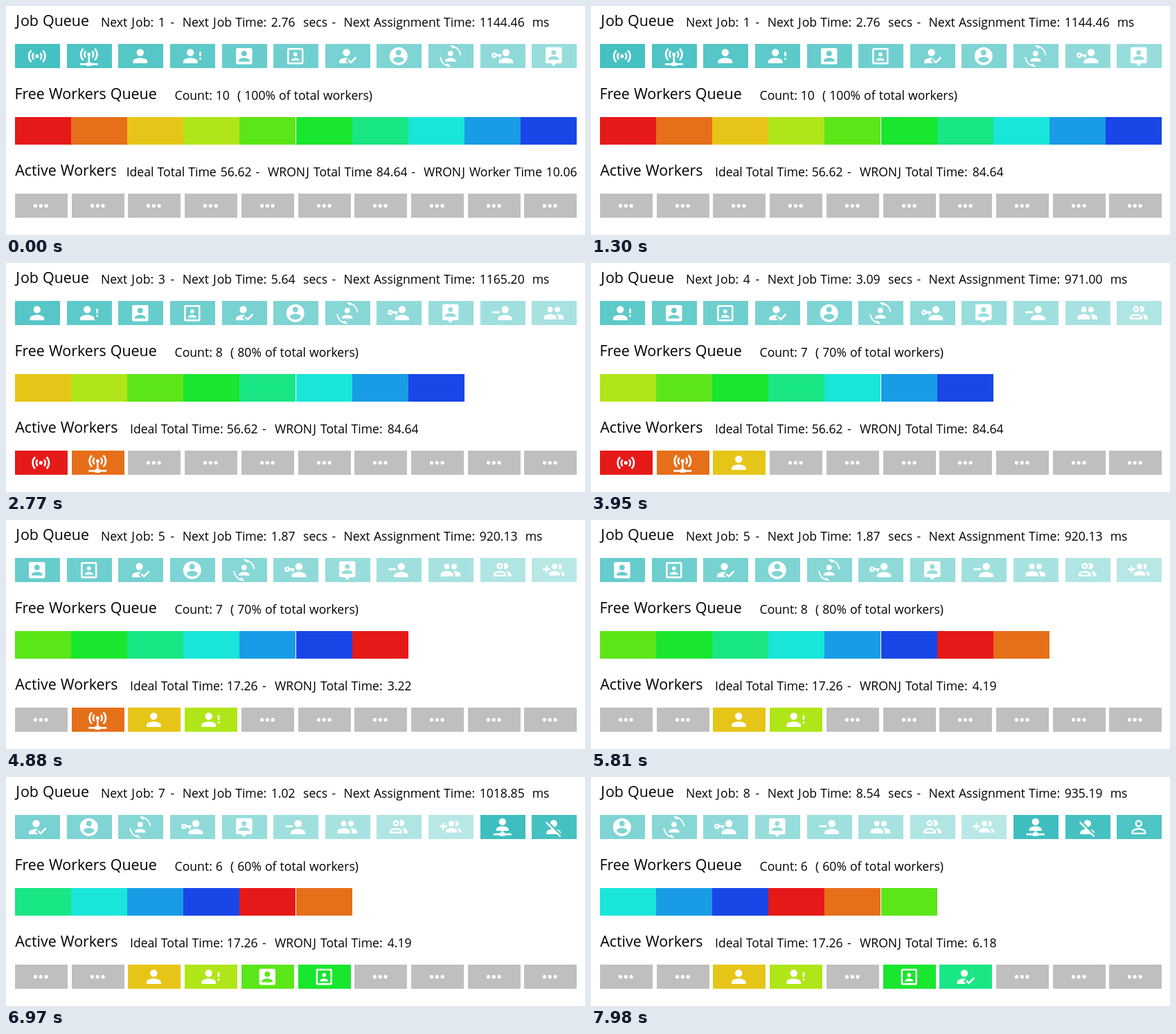
Recreate the animation shown at these times as an HTML page. Size 836 by 332 pixels, loop 8000 ms.

```html
<!DOCTYPE html>
<html lang="en">
<head>
<meta charset="utf-8">
<title>Job Queue</title>
<style>
html, body { margin: 0; width: 100%; height: 100%; overflow: hidden; background: #fff; }
svg { display: block; width: 836px; height: 332px; }
text { font: 17.6px "Open Sans", "Noto Sans", sans-serif; word-spacing: .5px; fill: #000; }
.title { font-size: 21.4px; }
.icon { fill: #fff; fill-rule: evenodd; }
</style>
</head>
<body>
<svg id="stage" viewBox="0 0 836 332">
  <defs>
    <clipPath id="titleClip"><rect x="0" y="222" width="158.5" height="34"/></clipPath>
    <clipPath id="timeClip"><rect x="600" y="222" width="174.5" height="34"/></clipPath>
  </defs>
  <g id="view"></g>
</svg>
<script>
const LOOP = 8000;
const RUN_START = 1300;

// ---- icons on a 24 unit grid ----
const disc = (x, y, r) => `M${x - r},${y}a${r},${r} 0 1 1 ${2 * r},0a${r},${r} 0 1 1 ${-2 * r},0Z`;
const wave = (cy, r, side) => {
  const a = r * Math.SQRT1_2, b = (r - 2) * Math.SQRT1_2, out = side > 0 ? 1 : 0;
  return `M${12 + side * a},${cy - a}A${r},${r} 0 0 ${out} ${12 + side * a},${cy + a}` +
    `L${12 + side * b},${cy + b}A${r - 2},${r - 2} 0 0 ${1 - out} ${12 + side * b},${cy - b}Z`;
};
const waves = cy => [6, 10].map(r => wave(cy, r, -1) + wave(cy, r, 1)).join("");
const bust = x => disc(x, 8, 4) + `M${x},14c4.42,0 8,1.79 8,4v2h-16v-2c0,-2.21 3.58,-4 8,-4Z`;
const smallBust = "M6,17C6,15 10,13.9 12,13.9C14,13.9 18,15 18,17V18H6Z" + disc(12, 9, 3);
const box = "M5,3H19A2,2 0 0 1 21,5V19A2,2 0 0 1 19,21H5A2,2 0 0 1 3,19V5A2,2 0 0 1 5,3Z";

const DOTS = disc(6, 12, 2) + disc(12, 12, 2) + disc(18, 12, 2);
const ICONS = [
  waves(12) + disc(12, 12, 2),
  waves(10) + "M12,8A2,2 0 0 0 10,10C10,10.74 10.4,11.39 11,11.73V19H10A1,1 0 0 0 9,20H2V22H9A1,1 0 0 0 10,23H14A1,1 0 0 0 15,22H22V20H15A1,1 0 0 0 14,19H13V11.73C13.6,11.38 14,10.73 14,10A2,2 0 0 0 12,8Z",
  bust(12),
  bust(10) + "M20,7h2v5h-2ZM20,14h2v2h-2Z",
  box + smallBust,
  box + "M5,5H19V19H5Z" + disc(12, 10, 2.25) + "M16.5,16.25C16.5,14.75 13.5,14 12,14C10.5,14 7.5,14.75 7.5,16.25V17H16.5Z",
  disc(11, 8, 4) + "M10,17L13,20H3V18C3,15.79 6.58,14 11,14L12.89,14.11ZM21.1,12.5L22.5,13.91L15.97,20.5L12.5,17L13.9,15.59L15.97,17.67Z",
  disc(12, 12, 10) + disc(12, 8, 3) + "M12,19.2C9.5,19.2 7.29,17.92 6,16C6.03,14 10,12.9 12,12.9C14,12.9 17.97,14 18,16C16.71,17.92 14.5,19.2 12,19.2Z",
  smallBust + "M7.5,21.5L8.85,20.16L12.66,23.97L12,24C5.71,24 .56,19.16 .05,13H1.55C1.91,16.76 4.25,19.94 7.5,21.5ZM16.5,2.5L15.15,3.84L11.34,.03L12,0C18.29,0 23.44,4.84 23.95,11H22.45C22.09,7.24 19.75,4.07 16.5,2.5Z",
  disc(16, 8, 4) + disc(3, 11, 1) + "M11,10V12H10V14H8V12H5.83C5.42,13.17 4.31,14 3,14A3,3 0 0 1 3,8C4.31,8 5.42,8.83 5.83,10ZM16,14C18.67,14 24,15.34 24,18V20H8V18C8,15.34 13.33,14 16,14Z",
  disc(12, 8, 2.7) + "M18,16H6V15.1C6,13.1 10,12 12,12C14,12 18,13.1 18,15.1ZM19,2H5A2,2 0 0 0 3,4V18A2,2 0 0 0 5,20H9L12,23L15,20H19A2,2 0 0 0 21,18V4A2,2 0 0 0 19,2Z",
  disc(15, 8, 4) + "M15,14C12.33,14 7,15.33 7,18V20H23V18C23,15.33 17.67,14 15,14ZM1,10V12H9V10Z",
  disc(8, 8, 3) + disc(16, 8, 3) + "M16,13C15.71,13 15.38,13 15.03,13.05C16.19,13.89 17,15 17,16.5V19H23V16.5C23,14.17 18.33,13 16,13ZM8,13C5.67,13 1,14.17 1,16.5V19H15V16.5C15,14.17 10.33,13 8,13Z",
  disc(9, 7.5, 3.5) + disc(9, 7.5, 1.5) + "M13.07,10.41A5,5 0 0 0 13.07,4.59A3.39,3.39 0 0 1 15,4A3.5,3.5 0 0 1 15,11A3.39,3.39 0 0 1 13.07,10.41ZM16,17V19H2V17S2,13 9,13S16,17 16,17ZM14,17C13.86,16.22 12.67,15 9,15S4.07,16.31 4,17ZM15.95,13A5.32,5.32 0 0 1 18,17V19H22V17S22,13.37 15.95,13Z",
  disc(13, 8, 3) + "M13,13C11,13 7,14 7,16V18H19V16C19,14 15,13 13,13ZM19.62,13.16C20.45,13.88 21,14.82 21,16V18H24V16C24,14.46 21.63,13.5 19.62,13.16ZM18,11A3,3 0 0 0 18,5C17.68,5 17.37,5.05 17.08,5.14C17.65,5.95 18,6.94 18,8C18,9.06 17.64,10.04 17.08,10.85C17.37,10.95 17.68,11 18,11ZM8,10H5V7H3V10H0V12H3V15H5V12H8Z",
  disc(12, 6, 4) + "M13,16V18H14A1,1 0 0 1 15,19H22V21H15A1,1 0 0 1 14,22H10A1,1 0 0 1 9,21H2V19H9A1,1 0 0 1 10,18H11V16H5V14.5C5,12.57 8.13,11 12,11C15.87,11 19,12.57 19,14.5V16Z",
  "M12,4A4,4 0 0,1 16,8C16,9.95 14.6,11.58 12.75,11.93L8.07,7.25C8.42,5.4 10.05,4 12,4ZM12.28,14L20,21.72L18.73,23L15.73,20H4V18C4,16.16 6.5,14.61 9.87,14.14L2.78,7.05L4.05,5.78ZM20,18V19.18L15.14,14.32C18,14.93 20,16.35 20,18Z",
  disc(12, 8, 4) + disc(12, 8, 2.1) + "M12,13C9.33,13 4,14.33 4,17V20H20V17C20,14.33 14.67,13 12,13ZM12,14.9C14.97,14.9 18.1,16.36 18.1,17V18.1H5.9V17C5.9,16.36 9,14.9 12,14.9Z"
];

// ---- schedule ----
const JOBS = [ // job time in secs, wait until assignment in ms
  ["2.76", "1144.46"], ["3.03", "931.40"], ["5.64", "1165.20"], ["3.09", "971.00"],
  ["1.87", "920.13"], ["10.51", "1074.96"], ["1.02", "1018.85"], ["8.54", "935.19"]
];
const EVENTS = [ // with a worker: that worker finishes; otherwise the next job is assigned
  { at: 1840 }, { at: 2770 }, { at: 3950 },
  { at: 4650, worker: 0, total: "3.22" }, { at: 4880 },
  { at: 5810, worker: 1, total: "4.19" }, { at: 5890 }, { at: 6970 },
  { at: 7750, worker: 4, total: "6.18" }, { at: 7980 }
];

function stateAt(t) {
  const s = { next: 0, free: [...Array(10).keys()], busy: {}, ideal: "56.62", total: "84.64", running: t >= RUN_START };
  for (const e of EVENTS) {
    if (t < e.at) break;
    if (e.worker === undefined) {
      s.busy[s.free.shift()] = s.next++;
    } else {
      delete s.busy[e.worker];
      s.free.push(e.worker);
      s.total = e.total;
      s.ideal = "17.26";
    }
  }
  return s;
}

// ---- drawing ----
const workerColor = i => `hsl(${25.2 * i},80%,50%)`;
const jobColor = i => {
  const k = (i + 1) % 16;
  return `rgb(${Math.round(62 + 8.1 * k)},${Math.round(190 + 2.8 * k)},${Math.round(191 + 2.6 * k)})`;
};
// a little room on both sides of the narrow J
const spaceJ = str => String(str).replace(/J(.?)/g, '<tspan dx="1">J</tspan><tspan dx="1">$1</tspan>');
const text = (x, y, str, attrs = "") => `<text x="${x}" y="${y}" ${attrs}>${spaceJ(str)}</text>`;
const title = (x, y, str, attrs = "") => text(x, y, str, 'class="title" ' + attrs);
const rect = (x, y, w, h, fill) => `<rect x="${x}" y="${y}" width="${w}" height="${h}" fill="${fill}"/>`;
const cell = (x, y, w, fill, path) => rect(x, y, w, 35, fill) +
  `<path class="icon" transform="translate(${x + w / 2 - 16.3},${y + 2.1}) scale(1.3)" d="${path}"/>`;

function jobRow(s) {
  const y = 30, [secs, ms] = JOBS[s.next];
  const d = 10 * (secs.length - 4), e = d + 10 * (ms.length - 7);
  let out = title(13.2, 29, "Job Queue") +
    text(137, y, "Next Job:") + text(219.7, y, s.next + 1) + text(237.5, y, "-") +
    text(254.7, y, "Next Job Time:") + text(382.7, y, secs) +
    text(429 + d, y, "secs") + text(470.5 + d, y, "-") +
    text(487.6 + d, y, "Next Assignment Time:") + text(683.7 + d, y, ms) + text(759.7 + e, y, "ms");
  for (let i = 0; i < 11; i++) {
    const job = s.next + i;
    out += cell(Math.round(13 + 74.63 * i), 55, 65, jobColor(job), ICONS[job]);
  }
  return out;
}

function freeRow(s) {
  const n = s.free.length;
  return title(12.5, 135, "Free Workers Queue") + text(243.6, 136, "Count:") + text(302.7, 136, n) +
    text(n > 9 ? 334 : 324, 136, `( ${n * 10}% of total workers)`) +
    s.free.map((w, i) => rect(Math.round(13 + 81.1 * i), 161, 81, 40, workerColor(w))).join("");
}

function activeRow(s) {
  const y = 247;
  let out;
  if (s.running) {
    out = title(13.3, 246, "Active Workers") +
      text(179, y, "Ideal Total Time:") + text(318.7, y, s.ideal) + text(370, y, "-") +
      text(388, y, "WRONJ Total Time:") + text(550.7, y, s.total);
  } else {
    out = title(13.3, 246, "Active Workers", 'clip-path="url(#titleClip)"') +
      text(173.7, y, "Ideal Total Time") + text(309.7, y, s.ideal) + text(360.5, y, "-") +
      text(378, y, "WRONJ Total Time") + text(534.7, y, s.total) + text(585.5, y, "-") +
      text(603, y, "WRONJ Worker Time", 'clip-path="url(#timeClip)"') + text(779.7, y, "10.06");
  }
  for (let w = 0; w < 10; w++) {
    const on = w in s.busy;
    out += cell(Math.round(13 + 81.7 * w), 272, 76, on ? workerColor(w) : "#bfbfbf", on ? ICONS[s.busy[w]] : DOTS);
  }
  return out;
}

const view = document.getElementById("view");
let shown = "";
function render(t) {
  const s = stateAt(t), key = JSON.stringify(s);
  if (key === shown) return;
  shown = key;
  view.innerHTML = jobRow(s) + freeRow(s) + activeRow(s);
}

const start = performance.now();
function tick() {
  render((performance.now() - start) % LOOP);
  requestAnimationFrame(tick);
}
tick();
</script>
</body>
</html>
```
